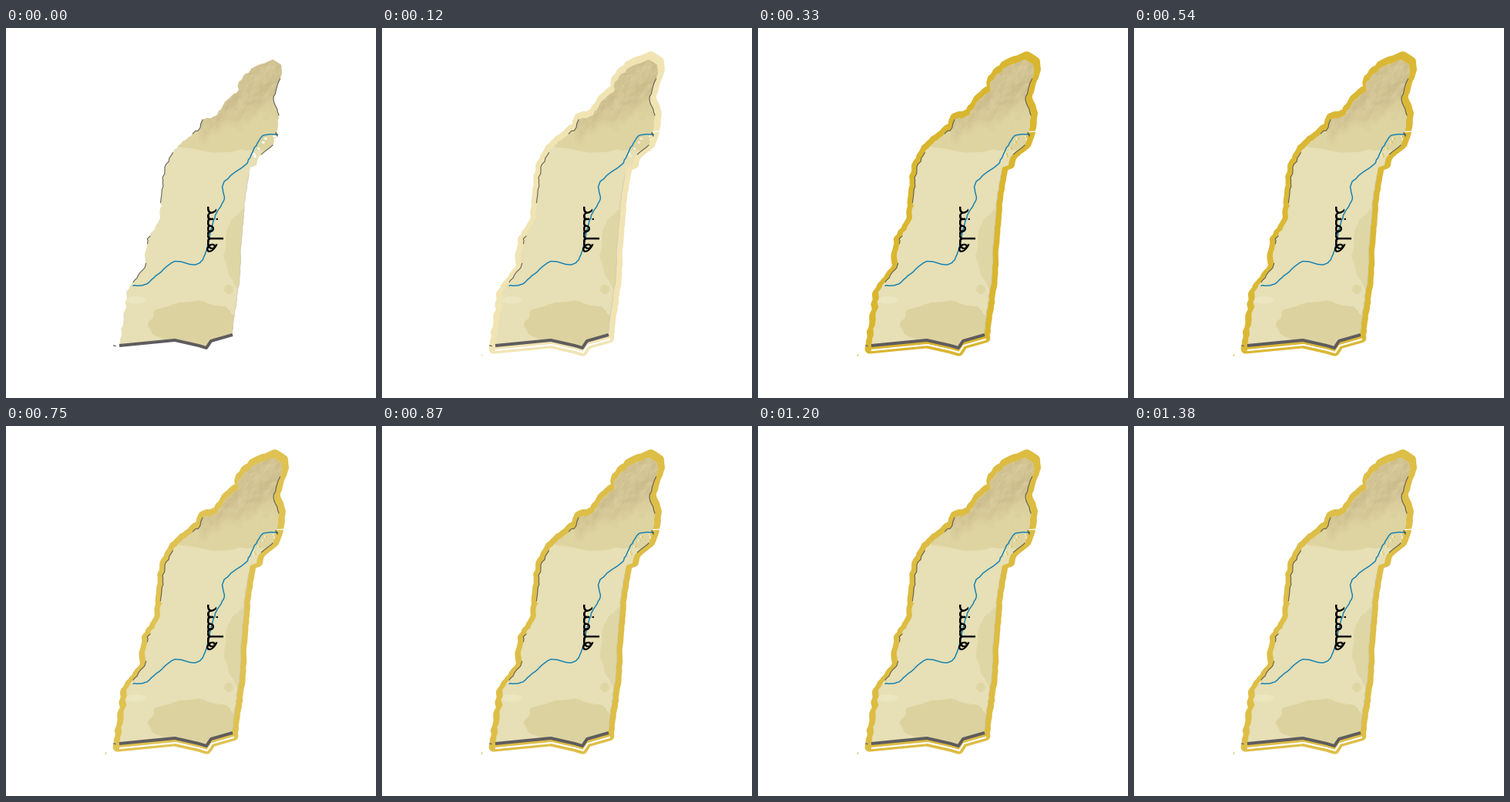
Animation of 480 by 480 pixels, one loop 1480 ms. Source, as a matplotlib script:

```python
import numpy as np
import matplotlib.pyplot as plt
from matplotlib.animation import FuncAnimation
from matplotlib.patches import Polygon

SIZE, DPI = 480, 100
PX = 72 / DPI                      # points per pixel
TICK, LOOP, STEP = 10, 1480, 30    # ms
LAST_STEP = 46
GLOW = np.array([211, 170, 14]) / 255

# key points of the map; the fine coastline is generated between them
EAST = [(346, 41), (357, 48), (358, 58), (347, 93), (354, 113), (351, 138),
        (346, 152), (328, 167), (325, 178), (317, 181), (311, 213),
        (306, 270), (303, 325), (293, 397)]
SOUTH = [(294, 398), (266, 406), (260, 415), (250, 412), (219, 405),
         (147, 412)]
WEST = [(147, 411), (158, 340), (180, 311), (180, 293), (187, 270),
        (200, 246), (201, 222), (206, 180), (218, 158), (252, 129),
        (255, 119), (274, 113), (284, 96), (302, 80), (302, 70), (318, 53),
        (335, 46), (346, 41)]
RIVER = [(165, 334), (180, 333), (198, 319), (219, 303), (246, 307),
         (258, 294), (266, 262), (273, 240), (283, 222), (281, 204),
         (292, 191), (311, 177), (321, 159), (333, 140), (352, 138)]

rng = np.random.default_rng(7)
fig = plt.figure(figsize=(SIZE / DPI, SIZE / DPI), dpi=DPI, facecolor="white")
ax = fig.add_axes([0, 0, 1, 1])
ax.axis("off")


def roughen(points, amount, spacing=4):
    """Subdivide a path and jitter the added points."""
    points = np.array(points, float)
    out = []
    for a, b in zip(points, points[1:]):
        n = max(1, int(np.hypot(*(b - a)) / spacing))
        t = np.arange(n)[:, None] / n
        out.append(a + (b - a) * t + rng.normal(0, amount, (n, 2)) * (t > 0))
    return np.vstack(out + [points[-1:]])


def smooth(points, n=6):
    """Catmull-Rom curve through the points."""
    p = np.array([points[0], *points, points[-1]], float)
    t = np.arange(n)[:, None] / n
    parts = [b + t / 2 * (c - a + t * (2 * a - 5 * b + 4 * c - d
                                       + t * (3 * (b - c) + d - a)))
             for a, b, c, d in zip(p, p[1:], p[2:], p[3:])]
    return np.vstack(parts + [p[-1:]])


def line(points, color, width, z, **kw):
    x, y = np.transpose(points)
    ax.plot(x, y, color=color, lw=width * PX, zorder=z,
            solid_joinstyle="round", **kw)


def area(points, color, z, rim=0):
    return ax.add_patch(Polygon(points, facecolor=color, edgecolor=color,
                                lw=rim * PX, joinstyle="round", zorder=z))


def blob(cx, cy, rx, ry, color, clip):
    """Ellipse with an uneven rim, cut off at the coast."""
    a = np.linspace(0, 2 * np.pi, 90)
    r = (1 + 0.03 * np.sin(7 * a) + 0.03 * np.sin(11 * a + cx)
         + rng.normal(0, 0.01, a.size))
    shape = np.c_[cx + rx * r * np.cos(a), cy + ry * r * np.sin(a)]
    area(shape, color, 3.1).set_clip_path(clip)


def noise(n, cells):
    """Square of bilinear value noise."""
    knots = np.arange(cells + 1)
    at = np.linspace(0, cells, n)
    grid = rng.random((cells + 1, cells + 1))
    rows = np.array([np.interp(at, knots, r) for r in grid])
    return np.array([np.interp(at, knots, c) for c in rows.T]).T


def draw_mountains(clip):
    n, left, top = 112, 250, 38
    height = sum(noise(n, c) / c for c in (10, 20, 40, 80))
    gy, gx = np.gradient(height)
    shade = np.clip(0.55 + (gx + gy) * 12, 0, 1)[..., None]
    y, x = np.mgrid[top:top + n, left:left + n]
    foot = 150 - 0.4 * (x - left) + 24 * (noise(n, 14) - 0.5)
    low, high = np.array([188, 166, 116]), np.array([224, 212, 168])
    img = np.empty((n, n, 4))
    img[..., :3] = (low + (high - low) * shade) / 255
    img[..., 3] = 0.8 * np.clip((foot - y) / 28, 0, 1)
    art = ax.imshow(img, extent=(left, left + n, top + n, top),
                    aspect="auto", interpolation="bilinear", zorder=4)
    art.set_clip_path(clip)


def draw_shadow(coast, spans):
    """Dark broken edge along the parts of a coast within the y spans."""
    for low, high in spans:
        inside = (coast[:, 1] >= low) & (coast[:, 1] <= high)
        line(coast[inside], "#4c4b45", 1.1, 4.4, alpha=0.85)


def draw_land(east, west, outline):
    land = area(outline, "#e7dfb5", 3)
    blob(285, 90, 120, 72, "#ddd4a1", land)
    blob(243, 384, 58, 29, "#dcd29f", land)
    blob(308, 288, 24, 50, "#dfd6a6", land)
    blob(289, 339, 6, 6, "#dfd6a6", land)
    blob(168, 353, 14, 5, "#ebe5c0", land)
    draw_mountains(land)
    draw_shadow(east, [(66, 117), (152, 165)])
    draw_shadow(west, [(119, 139), (160, 231), (270, 286), (304, 330)])
    line(east[east[:, 1] > 185], "#cfcab4", 0.8, 4.3)
    line([(140, 412), (142, 412.5)], "#77756c", 1.6, 4.4)
    line([(350, 136), (352, 140)], "#4c4b45", 1.3, 5.2)


def draw_halo(outline):
    """The land, slightly enlarged and with a thick rim."""
    center = np.array([240, 228])
    parts = [area(center + (outline - center) * 1.025, GLOW, 1, rim=12)]
    # gaps beside the upper river let the glow through
    x = rng.uniform(316, 350, 7)
    y = np.interp(x, [316, 334, 350], [172, 145, 143]) + rng.normal(0, 2, 7)
    ax.scatter(x, y, s=4, color="white", lw=0, zorder=4.2)
    parts.append(ax.scatter(x + 1, y, s=3, color=[GLOW], lw=0, zorder=4.25))
    parts.append(ax.scatter(129, 423.5, s=2, color=[GLOW], lw=0, zorder=1))
    # bare strip between the border and the outer rim
    line(np.array(SOUTH) + (1, 6), "white", 2.2, 2)
    line([(352, 134.5), (364, 134)], "white", 1.3, 2)
    return parts


def draw_label():
    # joined letter forms in visual order: dal, noon, meem, lam, heh
    word = "\ufeaa\ufee8\ufee4\ufee0\ufeeb"
    ax.text(258, 262, word, family="DejaVu Sans", size=28 * PX,
            color="black", rotation=-90, rotation_mode="anchor",
            ha="center", va="baseline", zorder=7)


def glow_level(step):
    """Quick linear rise, then a small settling swing."""
    return np.interp(step, [0, 12, 25, 34, LAST_STEP],
                     [0, 0.94, 0.72, 0.815, 0.765])


east, west = roughen(EAST, 0.4), roughen(WEST, 0.8)
outline = np.vstack([east, SOUTH, west])
halo = draw_halo(outline)
draw_land(east, west, outline)
line(smooth(RIVER) + rng.normal(0, 0.25, (6 * len(RIVER) - 5, 2)),
     "#1583b4", 1.5, 5)
line(SOUTH, "#5e5c5e", 4, 6, solid_capstyle="butt")
draw_label()
ax.set_xlim(0, SIZE)
ax.set_ylim(SIZE, 0)


def update(frame):
    step = min(frame * TICK // STEP, LAST_STEP)
    color = 1 - (1 - GLOW) * glow_level(step)
    for part in halo:
        part.set_color([tuple(color)] if part is not halo[0] else color)
    return halo


anim = FuncAnimation(fig, update, frames=LOOP // TICK, interval=TICK,
                     init_func=lambda: update(0), repeat=True,
                     repeat_delay=0, blit=False)
plt.show()
```
